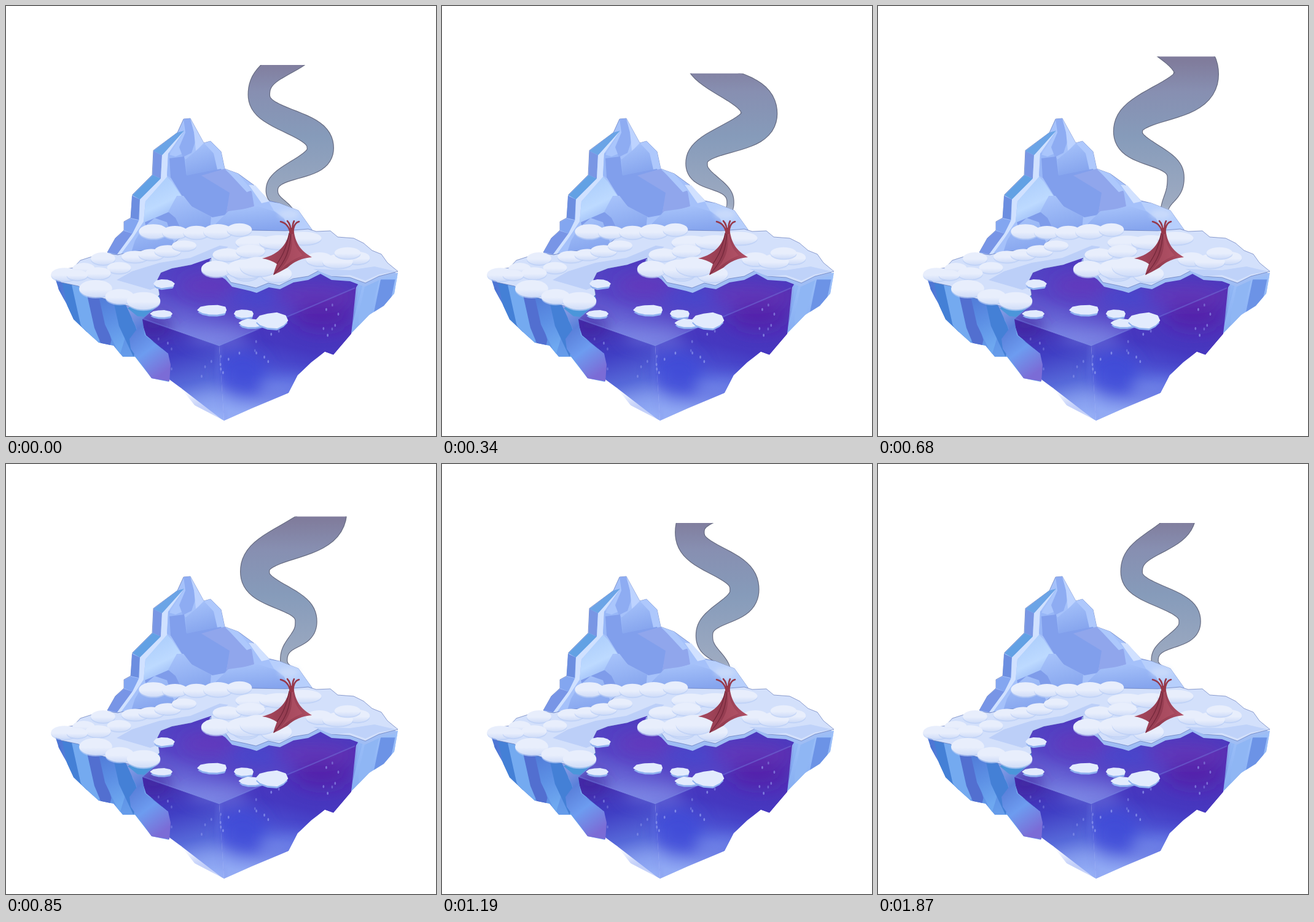
Animation, 700 px wide and 700 px high, one loop 2.04 s. Source, as an HTML page:

```html
<!DOCTYPE html>
<html lang="en">
<head>
<meta charset="utf-8">
<title>Winter island</title>
<style>
html, body { margin: 0; width: 100%; height: 100%; overflow: hidden; background: #fff; }
svg { display: block; width: 100vw; height: 100vh; }
</style>
</head>
<body>
<svg viewBox="0 0 700 700" xmlns="http://www.w3.org/2000/svg">
<defs>
  <linearGradient id="smokeFill" gradientUnits="userSpaceOnUse" x1="0" y1="90" x2="0" y2="335">
    <stop offset="0" stop-color="#807c9c"/><stop offset=".2" stop-color="#878fb1"/>
    <stop offset=".5" stop-color="#869bba"/><stop offset="1" stop-color="#a0acc2"/>
  </linearGradient>
  <linearGradient id="topFill" gradientUnits="userSpaceOnUse" x1="390" y1="410" x2="350" y2="553">
    <stop offset="0" stop-color="#4c3abf"/><stop offset=".6" stop-color="#5746c6"/><stop offset="1" stop-color="#7680e2"/>
  </linearGradient>
  <linearGradient id="leftFace" x1=".4" y1="0" x2=".6" y2="1">
    <stop offset="0" stop-color="#472fb0"/><stop offset=".35" stop-color="#403fc4"/>
    <stop offset=".65" stop-color="#586bda"/><stop offset="1" stop-color="#a0baf8"/>
  </linearGradient>
  <linearGradient id="rightFace" x1=".65" y1="0" x2=".4" y2="1">
    <stop offset="0" stop-color="#5630b4"/><stop offset=".45" stop-color="#4538c0"/>
    <stop offset=".7" stop-color="#4c58d8"/><stop offset="1" stop-color="#98b0f5"/>
  </linearGradient>
  <linearGradient id="chunk" x1=".2" y1="0" x2=".6" y2="1">
    <stop offset="0" stop-color="#93a5e8"/><stop offset=".35" stop-color="#5a80da"/>
    <stop offset=".65" stop-color="#6d9cf0"/><stop offset="1" stop-color="#7b6cd6"/>
  </linearGradient>
  <linearGradient id="deep" x1="0" y1="0" x2=".2" y2="1">
    <stop offset="0" stop-color="#4a6fd0"/><stop offset=".6" stop-color="#5c8fe4"/><stop offset="1" stop-color="#6ea8f0"/>
  </linearGradient>
  <linearGradient id="pale" x1="0" y1="0" x2=".2" y2="1">
    <stop offset="0" stop-color="#a4c6fb"/><stop offset=".6" stop-color="#86aef2"/><stop offset="1" stop-color="#606fd8"/>
  </linearGradient>
  <linearGradient id="puff" x1="0" y1="0" x2="0" y2="1">
    <stop offset=".55" stop-color="#e8eefc"/><stop offset="1" stop-color="#cfdcf8"/>
  </linearGradient>
  <linearGradient id="rock" x1="0" y1="0" x2=".3" y2="1">
    <stop offset="0" stop-color="#a9c5fb"/><stop offset="1" stop-color="#86a5ee"/>
  </linearGradient>
  <linearGradient id="bright" x1=".2" y1="0" x2=".6" y2="1">
    <stop offset="0" stop-color="#a9cbfb"/><stop offset=".6" stop-color="#bddaff"/><stop offset="1" stop-color="#93b4f5"/>
  </linearGradient>
  <linearGradient id="cloth" x1="0" y1="0" x2="1" y2="0">
    <stop offset="0" stop-color="#a8495f"/><stop offset=".5" stop-color="#943c50"/><stop offset="1" stop-color="#b04f66"/>
  </linearGradient>
  <filter id="soft" x="-60%" y="-60%" width="220%" height="220%"><feGaussianBlur stdDeviation="13"/></filter>
  <filter id="haze" x="-60%" y="-60%" width="220%" height="220%"><feGaussianBlur stdDeviation="4"/></filter>
  <clipPath id="waterClip"><path d="M219 508 250 430 345 398 575 450 562 534 533 568 519 563 497 580 475 601 460 630 400 655 355 675 307 650 285 622 266 608 264 566 228 536Z"/></clipPath>
  <clipPath id="leftClip"><path d="M79 440 86 462 98 484 110 510 131 530 151 548 175 553 190 571 210 571 237 606 266 612 270 500 150 440Z"/></clipPath>
  <clipPath id="rightClip"><path d="M638 434 632 468 615 488 591 503 562 533 560 515 570 452 606 440Z"/></clipPath>
  <clipPath id="cutClip"><rect id="cut" x="350" width="220" height="300"/></clipPath>
</defs>

<g clip-path="url(#cutClip)">
  <path id="smoke" fill="url(#smokeFill)" stroke="#686d83" stroke-width="2.4" paint-order="stroke"/>
</g>
<g id="mountain"></g>
<g id="leftWall" clip-path="url(#leftClip)"></g>
<g id="rightWall" clip-path="url(#rightClip)"></g>

<g clip-path="url(#waterClip)">
  <path fill="url(#topFill)" d="M200 508 250 425 345 395 575 450 570 458 347 553 219 508Z"/>
  <path fill="url(#leftFace)" d="M219 508 347 553 355 676 285 622 262 612 264 566 220 540Z"/>
  <path fill="url(#rightFace)" d="M347 553 570 457 562 534 533 568 519 563 475 601 460 630 355 676Z"/>
  <g id="glow" filter="url(#soft)"></g>
  <path d="M222 509 347 553 568 459" fill="none" stroke="#7788e6" stroke-width="2" opacity=".4"/>
  <path d="M347 553 Q341 610 355 675" fill="none" stroke="#8293ed" stroke-width="4" opacity=".4" filter="url(#haze)"/>
  <g id="specks" fill="#9aa5f2"></g>
</g>

<g id="land"></g>
<g id="puffs"></g>
<g id="floes"></g>

<g>
  <path fill="url(#cloth)" d="M462 361C460 386 446 404 417 411Q431 413 441 420Q437 430 435 438Q446 433 458 426Q474 411 498 409C480 399 470 386 468 361Z"/>
  <path fill="#b9586d" opacity=".5" d="M464 365C468 392 465 408 446 430Q463 414 483 406C472 395 468 384 466 365Z"/>
  <path fill="none" stroke="#74283b" stroke-width="1.3" d="M464 364C463 398 455 416 436 437M461 370C456 396 449 408 441 420"/>
  <path fill="none" stroke="#97384a" stroke-width="2.6" stroke-linecap="round" d="M463 370Q460 354 447 351M464 370Q464 356 458 350M466 370Q466 355 469 350M467 370Q468 353 477 351"/>
</g>
</svg>

<script>
const byId = id => document.getElementById(id);

function add(parent, tag, attrs) {
  const el = document.createElementNS('http://www.w3.org/2000/svg', tag);
  for (const k in attrs) el.setAttribute(k, attrs[k]);
  byId(parent).appendChild(el);
}
const shape = (parent, fill, pts, extra) => add(parent, 'path', { fill, d: `M${pts}Z`, ...extra });
const blob = (parent, cx, cy, rx, ry, extra) => add(parent, 'ellipse', { cx, cy, rx, ry, ...extra });

let seed = 7;
const rnd = () => (seed = seed * 16807 % 2147483647) / 2147483647;
const mix = (a, b, t) => a + (b - a) * t;

// Mountain facets, back to front
const rim = { stroke: '#6278b8', 'stroke-width': .7 };
const hill = (fill, pts, extra) => shape('mountain', fill, pts, extra);
hill('#a5c1fa', '165 401 178 378 192 365 192 351 203 345 206 307 238 275 240 235 279 206 289 184 300 183 322 223 333 220 350 237 356 265 378 273 404 292 428 317 445 321 476 333 498 364 498 400 180 412', rim);
hill('#6ba4e6', '240 236 279 206 290 203 266 235 254 243');
hill('#7996e4', '240 236 254 243 252 281 239 275');
hill('#62a1e4', '206 308 239 275 252 281 218 315');
hill('#6c8ee0', '205 309 218 315 216 348 203 345');
hill('#83a6f0', '192 352 203 346 216 349 207 371 192 365');
hill('#7895e6', '165 401 178 378 192 366 207 371 185 405');
hill('#d0e1ff', '290 203 264 240 262 280 227 318 224 351 206 378 187 404 181 404 206 370 217 348 218 315 252 281 254 243');
hill('url(#bright)', '262 278 270 286 286 310 272 337 224 354 227 318');
hill('#98b7f7', '264 240 283 233 292 250 294 276 268 280 262 276');
hill('#aac6fc', '289 184 293 205 282 228 288 240 276 245 266 242 290 205');
hill('#8eacf2', '289 184 300 183 309 218 302 239 288 246 282 230 292 206');
hill('#bdd3ff', '300 183 322 223 309 236 306 205');
hill('url(#rock)', '292 250 309 236 326 222 340 238 350 264 318 276 294 276');
hill('#aec8fc', '322 223 333 220 350 237 356 265 344 266 338 240');
hill('#819fec', '266 248 290 245 294 276 350 265 366 302 358 340 336 344 303 327 286 308 268 279');
hill('#90a6ec', '318 276 356 265 400 302 404 326 380 333 357 348 364 304');
hill('#adc8fc', '356 265 378 273 400 300 392 303 366 275');
hill('#d1e1ff', '395 291 406 292 429 318 416 321');
hill('#7f9cea', '226 352 268 334 300 347 286 370 232 374');
hill('url(#rock)', '278 309 289 309 302 326 334 343 332 365 290 374 276 345 264 335');
hill('url(#rock)', '222 362 242 345 262 352 276 392 203 404 210 382');
hill('url(#rock)', '334 362 362 334 384 331 410 326 436 334 455 348 462 369');
hill('#b7cffc', '428 319 445 321 476 333 498 364 462 369 452 344 436 333');
blob('mountain', 461, 339, 17, 8, { fill: '#cfdefa', opacity: .75, filter: 'url(#haze)' });

// Ice cliffs: slanted shards of varying width, cut to the cliff outline
function cliff(id, x, end, top, lean, colors) {
  add(id, 'rect', { x: x - 40, y: top, width: end - x + 80, height: 190, fill: colors[0] });
  for (let i = 0; x < end; i++) {
    const w = 13 + 13 * rnd(), y = top + 25 * rnd();
    shape(id, colors[i % colors.length], `${x} ${y} ${x + w} ${y} ${x + w + lean} ${y + 90} ${x + w * .6 + lean} ${y + 120} ${x + lean * .6} ${y + 70}`);
    x += w;
  }
}
cliff('leftWall', 76, 225, 435, 26, ['url(#deep)', '#4480d6', '#74aaf0', '#526fd0']);
cliff('rightWall', 566, 640, 425, -24, ['url(#pale)', '#8fb6f4', '#6c93e6']);

// Water light
const glow = (color, opacity, ...at) => blob('glow', ...at, { fill: color, opacity });
glow('#6d35b8', .6, 330, 455, 45, 18);
glow('#4648cf', .8, 420, 475, 60, 16);
glow('#6a32b4', .7, 500, 472, 65, 18);
glow('#3f239c', .7, 240, 520, 30, 20);
glow('#8590e8', .6, 345, 540, 50, 10);
glow('#3f4bd8', .8, 385, 600, 40, 40);
glow('#541fa6', .7, 515, 505, 45, 22);
glow('#8ba4f4', .6, 340, 655, 60, 20);
glow('#8ba4f4', .6, 460, 618, 45, 12);

// Specks below the front edges
for (let i = 0; i < 28; i++) {
  const x = mix(245, 560, rnd());
  const edge = x < 347 ? 553 - (347 - x) * .35 : 553 - (x - 347) * .43;
  blob('specks', x, edge + 10 + 55 * rnd(), 1.4, 2.5, { opacity: .3 + .4 * rnd() });
}

// Snow cover
const land = (fill, pts, extra) => shape('land', fill, pts, extra);
land('url(#chunk)', '194 484 222 500 248 474 250 486 222 510 226 536 264 566 268 584 266 611 237 606 203 558 201 542 213 526');
land('#4b96da', '198 492 222 478 250 472 248 486 225 506 214 505');
land('#9fbdf4', '332 412 330 428 357 445 368 457 398 464 408 467 428 458 446 461 468 450 492 446 512 436 530 446 560 448 584 457 608 446 636 438 632 430 560 420 420 410');
land('#d3e0fb', '79 439 92 429 110 426 121 414 146 406 165 403 182 405 205 400 264 394 285 376 345 364 455 366 492 363 505 367 528 366 540 376 566 378 582 386 596 398 611 404 621 418 638 432 607 440 585 451 560 442 530 440 511 430 492 440 467 444 445 455 427 451 407 459 390 455 366 450 357 438 333 424 334 408 318 412 302 421 270 427 252 434 246 446 250 470 238 484 205 490 165 478 134 468 118 456 90 450', rim);
land('#bccff8', '205 432 250 418 300 410 348 390 362 392 340 408 302 421 270 427 252 434 246 446 262 452 235 462 180 446');
land('#bfd2f9', '500 428 530 440 560 438 585 447 607 437 634 432 600 424 560 430');

// Rows of snow puffs from one end to the other
function row(count, x1, y1, x2, y2, rx, ry) {
  for (let i = 0; i < count; i++) {
    const t = count > 1 ? i / (count - 1) : 0, size = .9 + .2 * rnd();
    const x = mix(x1, x2, t), y = mix(y1, y2, t) + 3 * Math.sin(Math.PI * t);
    blob('puffs', x, y + 2, rx * size, ry * size, { fill: '#b9cdf6', opacity: .7 });
    blob('puffs', x, y, rx * size, ry * size, { fill: 'url(#puff)' });
  }
}
row(4, 210, 408, 290, 390, 21, 9);
row(5, 240, 367, 380, 364, 22, 11);
row(3, 158, 411, 95, 437, 20, 10);
row(3, 184, 426, 116, 438, 19, 9);
row(3, 146, 460, 224, 480, 25, 13);
row(3, 405, 385, 484, 378, 31, 11);
row(2, 360, 405, 398, 399, 25, 11);
row(3, 342, 428, 440, 436, 24, 13);
row(2, 390, 428, 412, 424, 30, 15);
row(3, 510, 412, 572, 410, 22, 11);
row(2, 540, 416, 556, 402, 23, 10);

// Floating ice: a rough oval with a shaded side below
function floe(cx, cy, rx, ry) {
  const pts = [];
  for (let i = 0; i < 10; i++) {
    const a = i * Math.PI / 5, r = .88 + .24 * rnd();
    pts.push(cx + rx * r * Math.cos(a), cy + ry * r * Math.sin(a));
  }
  const d = pts.join(' ');
  shape('floes', '#8fb1ef', d, { transform: 'translate(0 4)' });
  shape('floes', '#e2ebfd', d, { stroke: '#e2ebfd', 'stroke-width': 2, 'stroke-linejoin': 'round' });
}
floe(258, 452, 15, 6);
floe(253, 501, 16, 5);
floe(337, 495, 22, 7);
floe(388, 501, 15, 6);
floe(400, 516, 19, 6);
floe(433, 512, 25, 12);

// Smoke: bends are born at the tent, then rise, swing out and widen
const STEP = 170, COUNT = 12;
const bends = [
  { side: 1, birth: 1.5, sway: 32, fat: 23 },
  { side: -1, birth: 4.5, sway: 53, fat: 17 },
  { side: 1, birth: 7.5, sway: 56, fat: 36 },
  { side: -1, birth: 10.5, sway: 61, fat: 23 }
];
const root = { x: 465, y: 345, w: 5 };

function place({ side, birth, sway, fat }, n) {
  const age = (n - birth + COUNT) % COUNT;
  return {
    x: 463 + side * sway * (1 - Math.exp(-age / 2.2)),
    y: 328 - 17 * age - age * age,
    w: Math.min(3 + 4 * age, fat)
  };
}

function ribbon(n) {
  const nodes = bends.map(b => place(b, n)).concat(root).sort((a, b) => a.y - b.y);
  const left = [], right = [];
  for (let i = 0; i < nodes.length - 1; i++) {
    const a = nodes[i], b = nodes[i + 1];
    for (let t = 0; t < 1; t += .04) {
      const p = t * t, q = (1 - t) * (1 - t), s = p / (p + q);
      const slope = 2 * t * (1 - t) / (p + q) ** 2 * (b.x - a.x) / (b.y - a.y);
      const k = mix(a.w, b.w, s) / Math.hypot(1, slope);
      const x = mix(a.x, b.x, s), y = mix(a.y, b.y, t);
      left.push([x - k, y + k * slope]);
      right.unshift([x + k, y - k * slope]);
    }
  }
  return `M${left.concat(right).join(' ')}Z`;
}

// The upper end bobs while the widest bend passes through it
const cutAt = n => 96 + 17 * Math.sin(Math.PI * n / 3) * Math.sqrt(Math.max(0, Math.sin(Math.PI * n / 6)));

let shown = -1;
function draw(time) {
  const n = Math.floor(time / STEP) % COUNT;
  if (n === shown) return;
  shown = n;
  byId('smoke').setAttribute('d', ribbon(n));
  byId('cut').setAttribute('y', cutAt(n));
}

const start = performance.now();
function tick() {
  draw(performance.now() - start);
  requestAnimationFrame(tick);
}
tick();
</script>
</body>
</html>
```
